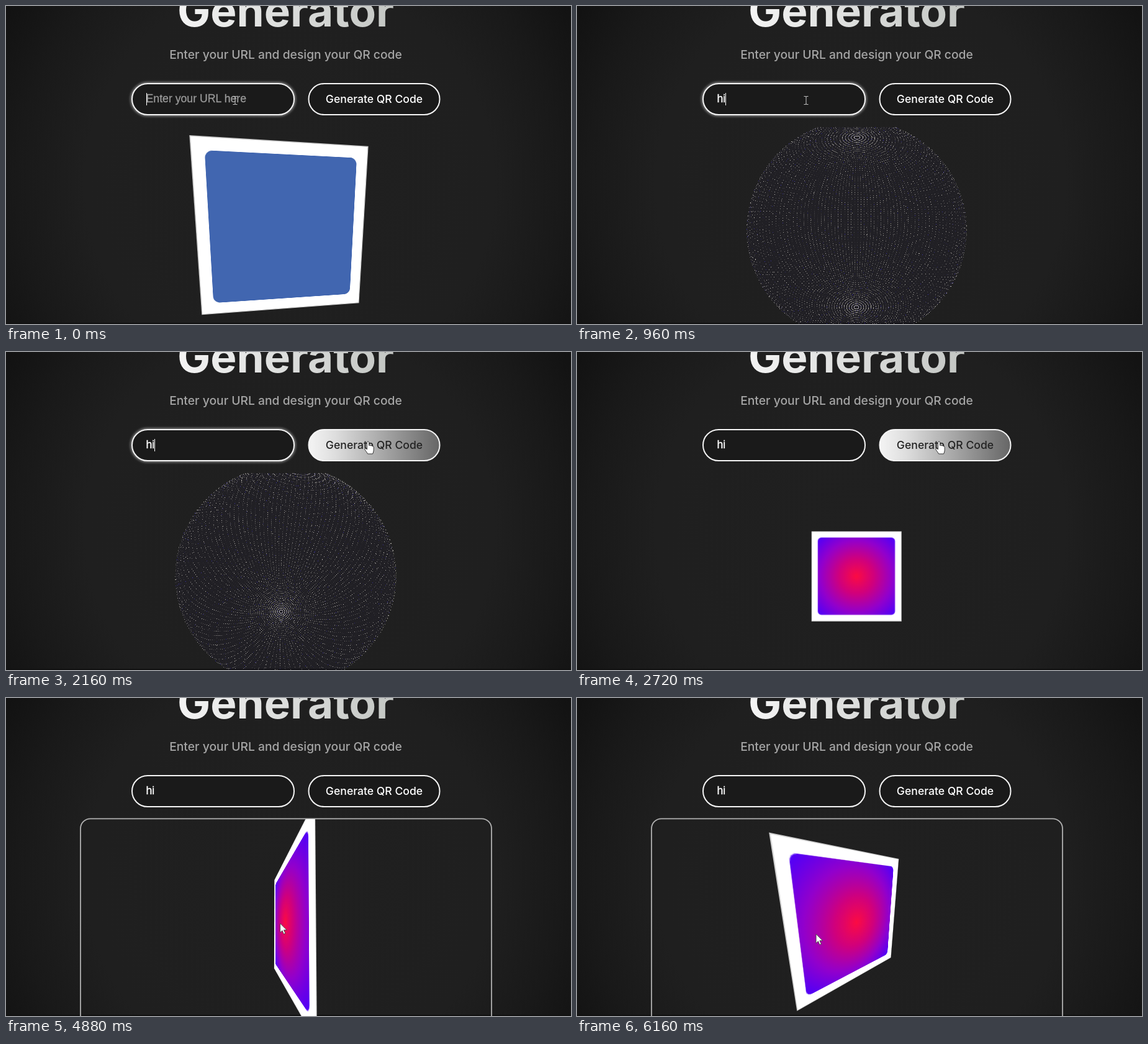
Animation, 910 px wide and 512 px high, one loop 6.24 s. Source, as an HTML page with a canvas:

```html
<!DOCTYPE html>
<html lang="en">
<head>
<meta charset="utf-8">
<title>Generator</title>
<style>
  html, body { margin: 0; width: 100%; height: 100%; overflow: hidden; background: #111; }
  #stage {
    position: relative; width: 910px; height: 512px; overflow: hidden;
    background: radial-gradient(circle at 457px 285px, #202020 0, #1f1f1f 330px, #191919 440px, #101010 560px);
  }
  svg, canvas { position: absolute; left: 0; top: 0; }
  text { font-family: Inter, sans-serif; }
  .field { font-family: "Liberation Sans", Arial, sans-serif; font-size: 17.7px; stroke-width: .3px; }
  #scene {
    position: absolute; left: 121px; top: 195px; width: 660px; height: 317px; overflow: hidden;
    perspective: 216px; perspective-origin: 329px 166px;
  }
  #card {
    position: absolute; left: 229px; top: 66px; width: 200px; height: 200px;
    background: #fff; box-shadow: inset 0 0 0 1px #ccc;
  }
  #panel { position: absolute; inset: 7%; border-radius: 8px; }
  #panel.blue { background: #4166b0; }
  #panel.warm { background: radial-gradient(circle, #fb0b43 0, #d0007c 32%, #9200cc 66%, #4a00fb 100%); }
</style>
</head>
<body>
<div id="stage">
  <svg width="910" height="512">
    <defs>
      <linearGradient id="titleFill"><stop offset="0" stop-color="#f4f4f4"/><stop offset="1" stop-color="#c3c6c3"/></linearGradient>
      <linearGradient id="hoverFill"><stop offset="0" stop-color="#f4f4f4"/><stop offset=".2" stop-color="#dedede"/><stop offset="1" stop-color="#666"/></linearGradient>
      <filter id="soft" x="-10%" y="-40%" width="120%" height="180%"><feGaussianBlur stdDeviation="2"/></filter>
    </defs>
    <rect y="510" width="910" height="2" fill="#111"/>
    <text x="450.5" y="33" text-anchor="middle" font-size="71" font-weight="700" fill="url(#titleFill)">Generator</text>
    <text x="450.5" y="84.5" text-anchor="middle" font-size="19.3" font-weight="500" fill="#a5a5a5">Enter your URL and design your QR code</text>

    <rect id="glow" x="203" y="125" width="261" height="50" rx="25" fill="none" stroke="#fff" stroke-width="4" filter="url(#soft)"/>
    <rect x="203" y="125" width="261" height="50" rx="25" fill="#1a1a1a" stroke="#f4f4f4" stroke-width="2"/>
    <text id="hint" class="field" x="225.5" y="155" fill="#999" stroke="#999">Enter your URL here</text>
    <text id="typed" class="field" x="225.5" y="155" fill="#fff" stroke="#fff"></text>
    <rect id="caret" y="140" width="1" height="20" fill="#fff"/>

    <rect id="button" x="487.5" y="125" width="211" height="50" rx="25" stroke="#f4f4f4" stroke-width="2"/>
    <text id="label" x="593" y="156" text-anchor="middle" font-size="17.6" font-weight="500">Generate QR Code</text>

    <rect id="frame" x="120" y="194.3" width="662" height="400" rx="16" fill="none" stroke="#b0b0b0" stroke-width="1.8"/>
  </svg>

  <div id="scene"><div id="card"><div id="panel"></div></div></div>
  <canvas id="globe" width="910" height="512"></canvas>

  <svg width="910" height="512">
    <g id="pointer">
      <path id="beam" d="M-3.5-6.5H-1Q0-6.5 0-5.5Q0-6.5 1-6.5H3.5M0-6V6M-3.5 6.5H-1Q0 6.5 0 5.5Q0 6.5 1 6.5H3.5" fill="none" stroke="#c4c4c4"/>
      <path id="arrow" d="M0 0V14.5L3.4 11.4L5.8 17L8.3 16L5.9 10.5H10.5Z" fill="#fff" stroke="#444" stroke-width=".9"/>
      <path id="hand" d="M-1.6 1Q0-1.2 1.6 1V6.4Q3.4 5.2 4.2 6.8Q6 5.8 6.9 7.6Q9 7 9.2 9.4V14Q9 17 7.6 20H-.4Q-2.4 16.5-5 13.2Q-5.4 10.6-3.2 11.2L-1.6 13Z" fill="#fff" stroke="#222" stroke-width=".9"/>
    </g>
  </svg>
</div>

<script>
const LOOP = 6240, STEP = 80;
const FOCAL = 216, CARD = 200, CX = 450, CY = 361;
const GLOBE_IN = 720, BLUR = 2200, CARD_IN = 2480, FRAME_IN = 3100, DRAG = 4558;
const KEY_GAP = 240, BLINK = 530;

const $ = id => document.getElementById(id);
const clamp = v => Math.min(1, Math.max(0, v));
const span = (t, from, length) => clamp((t - from) / length);
const smooth = k => k * k * (3 - 2 * k);
const easeOut = (k, power) => 1 - (1 - k) ** power;
const mix = (a, b, k) => a + (b - a) * k;
const show = (id, on) => { $(id).style.display = on ? "" : "none"; };

// The drag swings the card most of the way round and partly back.
const turnAt = t => 175 * Math.sin(Math.max(0, t - DRAG) / 1135 * Math.PI / 2);
const tiltAt = t => 18 * easeOut(span(t, 4880, 1280), 2) - 2 * span(t, DRAG, 320);

function pointerAt(t) {
  const toButton = smooth(span(t, 1040, 480));
  const toCard = smooth(span(t, 2840, 840));
  const toGrab = smooth(span(t, 3840, 520));
  const place = (a, b, c, d) => mix(mix(mix(a, b, toButton), c, toCard), d, toGrab);
  return [
    place(369, 583, 429, 508) - 0.88 * turnAt(t),
    place(152, 144, 374, 365) - 22 * Math.sin(Math.PI * toButton) + 0.95 * tiltAt(t)
  ];
}

function drawForm(t, hover) {
  const keys = Math.min(2, Math.floor(Math.max(0, t - 120) / KEY_GAP));
  $("typed").textContent = "hi".slice(0, keys);
  show("hint", !keys);
  const since = keys ? t - 120 - keys * KEY_GAP : t;
  show("caret", t < BLUR && since % (2 * BLINK) < BLINK);
  $("caret").setAttribute("x", Math.round(225.5 + $("typed").getComputedTextLength()));
  $("glow").setAttribute("opacity", 0.6 * (1 - span(t, BLUR, 300)));
  $("button").setAttribute("fill", hover ? "url(#hoverFill)" : "#1a1a1a");
  $("label").setAttribute("fill", hover ? "#222" : "#fff");
  $("frame").setAttribute("opacity", span(t, FRAME_IN, 400));
}

function drawCard(t) {
  const first = t < GLOBE_IN;
  show("card", first || t >= CARD_IN);
  $("panel").className = first ? "blue" : "warm";
  const pop = easeOut(span(t, CARD_IN - 20, 480), 3);
  const size = first ? 270 : 160 * pop + 49 * span(t, 3880, 520);
  const turn = first ? t / 640 - 6.3 : turnAt(t);
  const tilt = first ? 5.9 : tiltAt(t);
  const z = FOCAL - FOCAL / Math.max(1, size) * CARD;
  $("card").style.transform = `translateZ(${z}px) rotateX(${-tilt}deg) rotateY(${-turn}deg)`;
}

const ctx = $("globe").getContext("2d");

function drawGlobe(t) {
  ctx.clearRect(0, 0, 910, 512);
  if (t < GLOBE_IN || t >= CARD_IN) return;
  const N = 100, R = 0.634;
  const angle = Math.max(0, t - 728) * 0.000628;
  const roll = 0.045 * Math.max(0, (t - 900) / 700);
  const c = Math.cos(angle), s = Math.sin(angle);
  ctx.save();
  ctx.beginPath();
  ctx.rect(121, 195, 660, 317);
  ctx.clip();
  ctx.fillStyle = "rgba(60,45,120,.07)";
  ctx.beginPath();
  ctx.arc(CX, CY, 177, 0, 7);
  ctx.fill();
  for (let i = 1; i < N; i++) {
    const lat = Math.PI * i / N, ring = Math.sin(lat), y0 = Math.cos(lat);
    for (let j = 0; j < N; j++) {
      const lon = 2 * Math.PI * j / N + angle;
      const x0 = ring * Math.cos(lon), z0 = ring * Math.sin(lon);
      const x = x0 + y0 * roll, y = y0 - x0 * roll;
      const k = FOCAL * R / (1 - R * (y * s + z0 * c));
      const px = CX + 0.5 + x * k, py = CY - (y * c - z0 * s) * k;
      const ix = Math.floor(px), iy = Math.floor(py);
      // fine points glint when they sit near a pixel centre
      const off = Math.hypot(px - ix - 0.5, py - iy - 0.5);
      ctx.globalAlpha = 0.06 + 0.9 * clamp(1.25 - off * 2.4);
      ctx.fillStyle = (i * 7 + j * 13) % 9 ? "#c9c5be" : "#4238b8";
      ctx.fillRect(ix, iy, 1, 1);
    }
  }
  ctx.restore();
}

function render(t) {
  const [x, y] = pointerAt(t);
  const inRow = y > 124 && y < 176;
  const hover = inRow && x > 487 && x < 699;
  const beam = inRow && x > 202 && x < 465;
  $("pointer").setAttribute("transform", `translate(${x} ${y})`);
  show("beam", beam);
  show("hand", hover);
  show("arrow", !beam && !hover);
  drawForm(t, hover);
  drawCard(t);
  drawGlobe(t);
}

const start = performance.now();
let last = -1;
function tick() {
  const t = Math.floor((performance.now() - start) % LOOP / STEP) * STEP;
  if (t !== last) render(last = t);
  requestAnimationFrame(tick);
}
tick();
</script>
</body>
</html>
```
